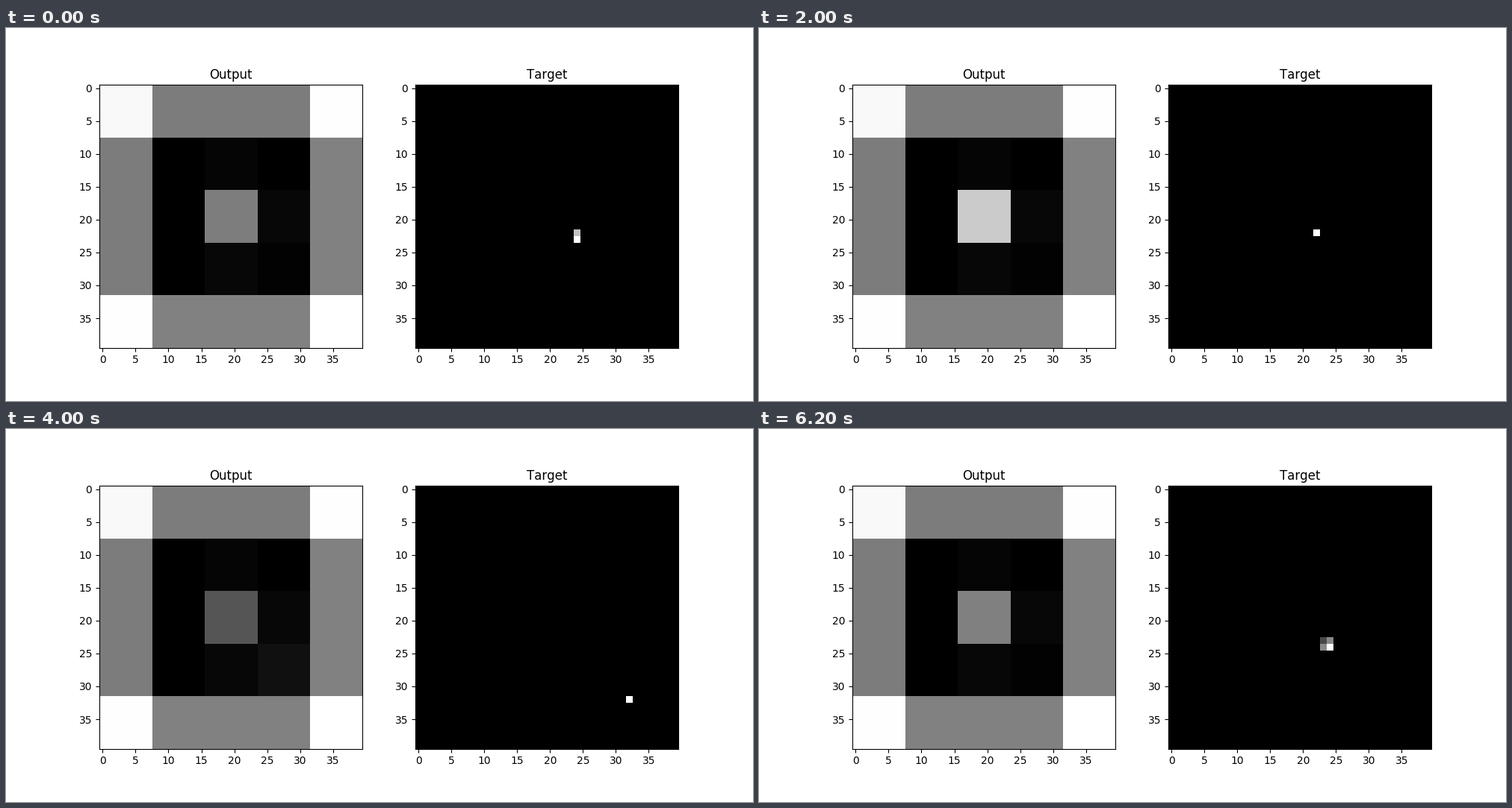
Recreate the animation shown at these times as a matplotlib script. Size 1000 by 500 pixels, loop 6400 ms.

```python
import numpy as np
import matplotlib.pyplot as plt
from matplotlib.animation import FuncAnimation

SIZE, BLOCK = 40, 8
STEPS, INTERVAL = 32, 200

# Turning points of the lit spot: (step, column, row), linear in between.
PATH = [(0, 24, 22.57), (3, 25, 27), (6, 38, 38), (8, 25, 25), (9, 25, 25),
        (10, 22, 22), (14, 34, 34), (18, 26, 26), (20, 32, 32), (24, 25, 25),
        (27, 37, 37), (28, 38, 38), (30, 25, 25), (31, 23.65, 23.65)]

# Grey of a block against the spot's distance along the diagonal.
CENTRE = [(22, 203), (23.3, 124), (25, 142), (26, 90), (32, 85), (34, 68)]
CORNER = [(25, 2), (26, 16), (32, 16), (34, 72)]


def interpolate(x, points):
    xs, *curves = zip(*points)
    return [np.interp(x, xs, ys) for ys in curves]


def output_image(step):
    place = sum(interpolate(step, PATH)) / 2
    edge = np.array([124.5, 0, 0, 0, 129])
    blocks = np.add.outer(edge, edge)
    blocks[1, 2] = 5
    blocks[2, 3] = blocks[3, 2] = 7
    blocks[2, 2], = interpolate(place, CENTRE)
    blocks[3, 3], = interpolate(place, CORNER)
    return np.kron(blocks, np.ones((BLOCK, BLOCK)))


def target_image(step):
    """Spread the spot over the nearest cells, brightest one white."""
    cells = np.arange(SIZE)
    col, row = [np.clip(1 - abs(cells - at), 0, 1)
                for at in interpolate(step, PATH)]
    spot = np.outer(row, col)
    return 255 * spot / spot.max()


def add_panel(ax, title, image):
    ax.set_title(title)
    ticks = range(0, SIZE, 5)
    ax.set_xticks(ticks)
    ax.set_yticks(ticks)
    return ax.imshow(image, cmap="gray", vmin=0, vmax=255,
                     interpolation="nearest")


plt.rcParams["font.family"] = "DejaVu Sans"
plt.rcParams["text.kerning_factor"] = 6  # whole-pixel letter spacing
fig, (left, right) = plt.subplots(1, 2, figsize=(10, 5), dpi=100)
output = add_panel(left, "Output", output_image(0))
target = add_panel(right, "Target", target_image(0))


def update(step):
    output.set_data(output_image(step))
    target.set_data(target_image(step))
    return output, target


anim = FuncAnimation(fig, update, frames=STEPS, interval=INTERVAL,
                     repeat=True, repeat_delay=0)
plt.show()
```
